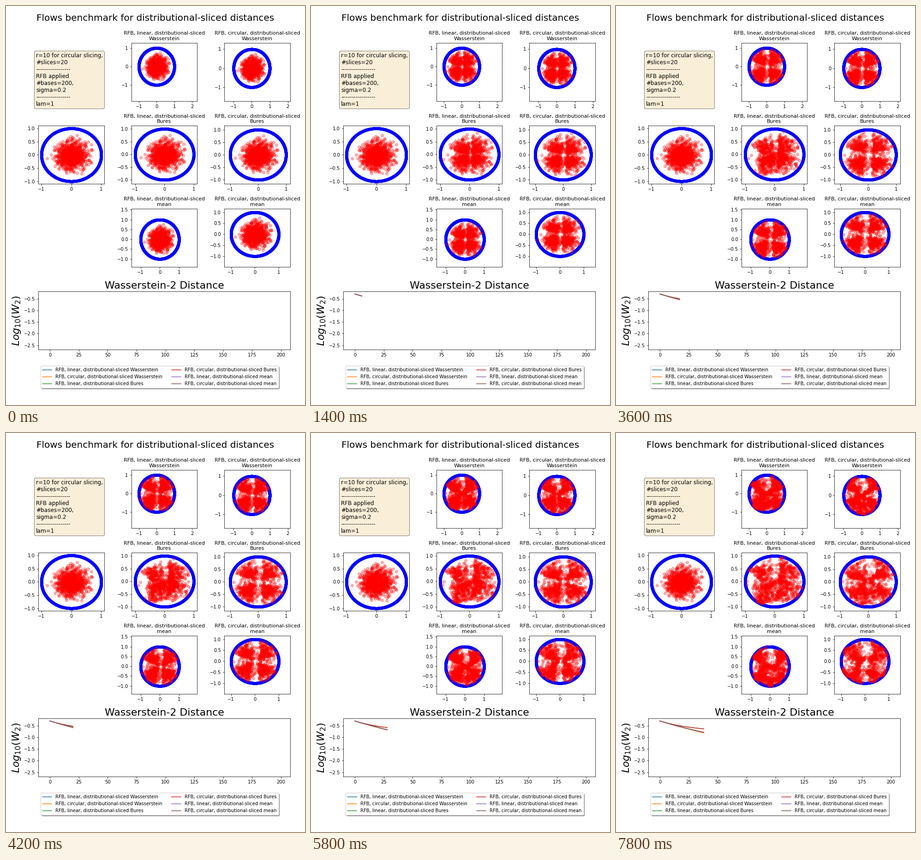
These frames come from a looping animation (648 by 864 pixels, 8000 ms). A matplotlib script:

```python
import numpy as np
import matplotlib.pyplot as plt
from matplotlib.animation import FuncAnimation
from matplotlib.ticker import MultipleLocator
from matplotlib.transforms import IdentityTransform

W, H, DPI = 648, 864, 72
FRAMES, INTERVAL = 40, 200
SIGMA, COUNT = 0.25, 1000

plt.rcParams["font.family"] = "DejaVu Sans"
fig = plt.figure(figsize=(W / DPI, H / DPI), dpi=DPI, facecolor="white")

cloud = np.random.default_rng(7).normal(0, SIGMA, (COUNT, 2))
x0, y0 = cloud.T
# radius each dot would have if the cloud filled the unit disc evenly
disc_radius = np.sqrt(1 - np.exp(-(x0**2 + y0**2) / (2 * SIGMA**2)))
angle = np.linspace(0, 2 * np.pi, COUNT)


def ramp(n, start, length):
    return np.clip((n - start) / length, 0, 1)


def with_radius(p, rule):
    r = np.hypot(*p.T)
    return p * (rule(r) / r)[:, None]


def soft_cap(r):
    return np.where(r > 0.95, 0.95 + 0.4 * (r - 0.95), r)


class Flow:
    """Cloud that splits into four lobes and then spreads to the circle."""

    def __init__(self, dots, gap, mix, wave, start, seed):
        self.dots, self.gap, self.mix = dots, gap, mix
        self.wave, self.start = wave, start
        rng = np.random.default_rng(seed)
        self.phase = rng.uniform(0, 2 * np.pi, 4)
        self.noise = rng.normal(0, 0.4, (COUNT, 2))

    def at(self, n):
        if n == 0:
            return cloud
        # the cross opens, then closes below and in the middle
        shift = self.gap * (1 - np.exp(-n / 6))
        close = 0.8 * ramp(n, self.start, 16)
        keep_x = 1 - close / (1 + np.exp(14 * y0))
        keep_y = 1 - close * np.exp(-(x0 / 0.3)**2)
        keep = np.column_stack([keep_x, keep_y])
        p = cloud + shift * keep * np.tanh(cloud / 0.02)

        m = self.mix * ramp(n, 8, 30)
        p = with_radius(p, lambda r: (1 - m) * r + m * disc_radius)

        x, y = p.T
        a, b, c, d = self.phase
        w = self.wave * ramp(n, self.start, 20)
        dx = (0.7 - 0.5 * y) * (np.sin(5 * y + a) + 0.6 * np.sin(10 * x + b))
        dy = np.sin(5 * x + c) + 0.6 * np.sin(10 * y + d)
        p = p + w * (np.column_stack([dx, dy]) + self.noise)
        return with_radius(p, soft_cap)


def add_axes(col, row, span=1):
    x, y = 70.2 + 201.5 * col, 79.9 + 179.4 * row
    w, h = 142.7 + 201.5 * (span - 1), 126
    return fig.add_axes([x / W, 1 - (y + h) / H, w / W, h / H])


def set_ticks(ax, xstep, ystep):
    ax.xaxis.set_major_locator(MultipleLocator(xstep))
    ax.yaxis.set_major_locator(MultipleLocator(ystep))


def add_panel(col, row, left, right, bottom, top, title=""):
    ax = add_axes(col, row)
    ax.scatter(np.cos(angle), np.sin(angle), color="blue", alpha=0.3)
    dots = ax.scatter(x0, y0, color="red", alpha=0.3)
    ax.set(xlim=(left, right), ylim=(bottom, top))
    set_ticks(ax, 1, 0.5 if top - bottom < 3 else 1)
    ax.set_title(title, fontsize=11)
    return dots


fig.suptitle("Flows benchmark for distributional-sliced distances", fontsize=20)
rule = "-" * 17
note = (f"r=10 for circular slicing,\n#slices=20\n{rule}\n"
        f"RFB applied\n#bases=200,\nsigma=0.2\n{rule}\nlam=1")
fig.text(65 / W, 1 - 101 / H, note, fontsize=12, va="top",
         bbox=dict(boxstyle="round", facecolor="wheat", alpha=0.5))

add_panel(0, 1, -1.1, 1.1, -1.1, 1.1)

plot = add_axes(0, 3, span=3)
plot.set(xlim=(-9.9, 207.9), ylim=(-2.688, -0.193))
set_ticks(plot, 25, 0.5)
plot.set_title("Wasserstein-2 Distance", fontsize=22)
plot.set_ylabel("$Log_{10}(W_2)$", fontsize=22)

# view: left, right, bottom, top
views = {
    ("Wasserstein", "linear"): (-1.42, 2.29, -1.875, 1.275),
    ("Wasserstein", "circular"): (-1.51, 2.13, -1.73, 1.33),
    ("Bures", "linear"): (-1.126, 1.118, -1.163, 1.12),
    ("Bures", "circular"): (-1.205, 1.15, -1.165, 1.155),
    ("mean", "linear"): (-1.482, 1.952, -1.4, 1.565),
    ("mean", "circular"): (-1.28, 1.484, -1.484, 1.168),
}
styles = {
    "Wasserstein": dict(gap=0.2, mix=0.75, wave=0.07, start=18),
    "Bures": dict(gap=0.16, mix=0.6, wave=0.06, start=22),
    "mean": dict(gap=0.2, mix=0.9, wave=0.09, start=17),
}

flows, lines, drops = [], [], []
for i, ((metric, slicing), view) in enumerate(views.items()):
    style = dict(styles[metric])
    drop = 0.48 if metric == "Bures" else 1.5
    if (metric, slicing) == ("Bures", "linear"):
        style.update(gap=0.13, wave=0.08, start=3)
    if (metric, slicing) == ("Wasserstein", "circular"):
        drop = 2.15
    name = f"RFB, {slicing}, distributional-sliced"
    dots = add_panel(1 + i % 2, i // 2, *view, title=f"{name}\n{metric}")
    flows.append(Flow(dots, **style, seed=20 + i))
    lines += plot.plot([], [], color=f"C{i}", label=f"{name} {metric}")
    drops.append(drop)

plot.legend(loc="upper center", bbox_to_anchor=(333, H - 779.3),
            bbox_transform=IdentityTransform(), borderaxespad=0,
            ncol=2, fontsize=10, fancybox=True, shadow=True)


def update(k):
    steps = np.arange(k)
    for flow, line, drop in zip(flows, lines, drops):
        flow.dots.set_offsets(flow.at(max(k - 1, 0)))
        fall = drop * (1 - np.exp(-0.0155 * steps / drop))
        line.set_data(steps, -0.3 - fall)
    return lines


anim = FuncAnimation(fig, update, frames=FRAMES, interval=INTERVAL,
                     repeat=True, repeat_delay=0, blit=False)
plt.show()
```
